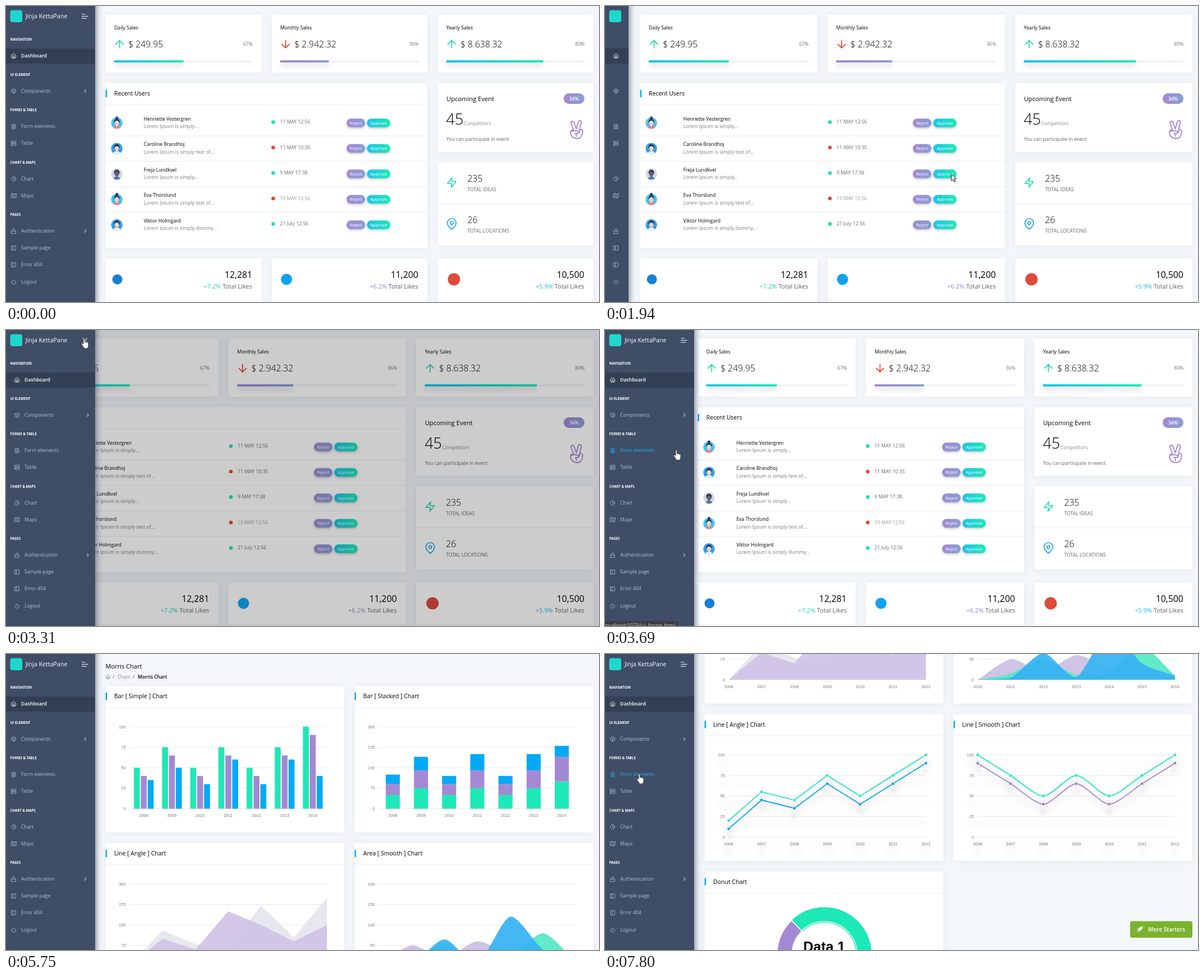
Animation, 1058 px wide and 529 px high, one loop 8 s. Source, as an HTML page with a canvas:

```html
<!DOCTYPE html>
<html lang="en">
<head>
<meta charset="utf-8">
<title>Dashboard tour</title>
<style>
html, body { margin: 0; width: 100%; height: 100%; overflow: hidden; background: #f4f7fa; }
canvas { display: block; width: 1058px; height: 529px; }
</style>
</head>
<body>
<canvas id="stage"></canvas>
<script>
const W = 1058, H = 529, LOOP = 8000, RIGHT = 1048, GAP = 18.5;
const canvas = document.getElementById('stage'), ctx = canvas.getContext('2d');
const dpr = window.devicePixelRatio || 1;
canvas.width = W * dpr;
canvas.height = H * dpr;

const GREEN = '#1de9b6', BLUE = '#04a9f5', PURPLE = '#a389d4', RED = '#e8452f', GREY = '#70737a';
const COOL = ['#1dc4e9', GREEN], VIOLET = [PURPLE, '#899ed4'];

const ICONS = {
  home: 'M3 9l9-7 9 7v11a2 2 0 0 1-2 2H5a2 2 0 0 1-2-2zM9 22V12h6v10',
  box: 'M21 16V8a2 2 0 0 0-1-1.7l-7-4a2 2 0 0 0-2 0l-7 4A2 2 0 0 0 3 8v8a2 2 0 0 0 1 1.7l7 4a2 2 0 0 0 2 0l7-4A2 2 0 0 0 21 16zM3.3 7L12 12l8.7-5M12 22V12',
  file: 'M14 2H6a2 2 0 0 0-2 2v16a2 2 0 0 0 2 2h12a2 2 0 0 0 2-2V8zM14 2v6h6M16 13H8M16 17H8M10 9H8',
  server: 'M2 3h20v7H2zM2 14h20v7H2zM6 6.5h1M6 17.5h1',
  pie: 'M21.2 15.9A10 10 0 1 1 8 2.8M22 12A10 10 0 0 0 12 2v10z',
  map: 'M1 6v16l7-4 8 4 7-4V2l-7 4-8-4zM8 2v16M16 6v16',
  lock: 'M3 11h18v11H3zM7 11V7a5 5 0 0 1 10 0v4',
  panel: 'M3 3h18v18H3zM9 3v18',
  power: 'M18.4 6.6a9 9 0 1 1-12.8 0M12 2v10',
  zap: 'M13 2L3 14h9l-1 8 10-12h-9z',
  pin: 'M21 10c0 7-9 13-9 13s-9-6-9-13a9 9 0 0 1 18 0zM15 10a3 3 0 1 1-6 0 3 3 0 0 1 6 0z',
  up: 'M12 19V5M5 12l7-7 7 7',
  down: 'M12 5v14M19 12l-7 7-7-7',
  chevron: 'M9 18l6-6-6-6',
  close: 'M19 5L5 19M5 5l14 14',
  menu: 'M2 5h11M2 12h20M2 19h15',
  victory: 'M6.5 13L2.2 .5a2.7 2.7 0 0 1 5.1-1.8L11.5 10.5 15.2-2.2a2.7 2.7 0 0 1 5.2 1.5L17.5 11.5C21 11 23.3 13 22.8 16C22.5 23 19 28 12.5 28C6 28 1.5 23.5 1 17C1 14 3.5 12 6.5 13zM2 15.5C5 13 9 14 13.5 14.5a2 2 0 0 1 0 4.5H9.5C11.5 20 12 22 11.5 24M17.5 11.5V16.5'
};
const ARROW = new Path2D('M0 0V12.5L3 9.8 5 14.4 7 13.5 5 9H9z');
const HAND = new Path2D('M4 10V1.8a1.3 1.3 0 0 1 2.6 0V7a1.2 1.2 0 0 1 2.3.4a1.2 1.2 0 0 1 2.2.5a1 1 0 0 1 1.9.6V13q0 2-1.2 3.2V18H5v-1.8Q3.5 15 2.5 13L.8 10.3a1.2 1.2 0 0 1 1.8-1.4z');
const ROCKET = new Path2D('M6-6C1-6-2-3-3.5-.5L-6 0-5 1.5-3.5 2-2 3.5-1.5 5 0 6 .5 3.5C3 2 6-1 6-6zM-5.5 3L-3 5.5-6 6z');

const MENU = [
  ['NAVIGATION', 59.5], ['Dashboard', 88.5, 'home'],
  ['UI ELEMENT', 123], ['Components', 151.5, 'box', true],
  ['FORMS & TABLE', 186], ['Form elements', 215, 'file'], ['Table', 245, 'server'],
  ['CHART & MAPS', 279.5], ['Chart', 308.5, 'pie'], ['Maps', 338.5, 'map'],
  ['PAGES', 372.5], ['Authentication', 402, 'lock', true], ['Sample page', 432, 'panel'],
  ['Error 404', 462, 'panel'], ['Logout', 492.5, 'power']
];

// Each step holds until the next one.
const mini = { main: 44, mini: true };
const charts = { page: 'charts', drawn: true };
const STEPS = [
  [0, {}],
  [940, { arrow: [169.5, 269.5] }],
  [1260, { ...mini, main: 54.5, dim: .18, hand: [114, 82], status: 66 }],
  [1610, { ...mini, nav: 60, ink: .3, arrow: [360, 230], status: 66 }],
  [1940, { ...mini, nav: 42, ink: 0, arrow: [618, 300] }],
  [2290, { ...mini, nav: 42, ink: 0, arrow: [330, 61] }],
  [2640, { ...mini, nav: 102, ink: .71, dim: .1, hand: [89, 25] }],
  [2980, { ...mini, dim: .2, hand: [147, 20] }],
  [3310, { ...mini, dim: .2, hand: [134, 15] }],
  [3690, { main: 146.8, hover: 'Form elements', hand: [122, 214.5], status: 130, path: '/ui_forms.html' }],
  [4020, { hover: 'Chart', hand: [110, 300], status: 130, path: '/charts-morris.html' }],
  [4360, { hover: 'Chart', hand: [104, 302], status: 355, path: '/charts-morris.html' }],
  [4710, { page: 'charts', status: 355, path: '/charts-morris.html' }],
  [5060, { page: 'charts' }],
  [5750, charts],
  [6430, { ...charts, arrow: [360, 327] }],
  [6780, { ...charts, scroll: 358, arrow: [363.5, 328.5], button: [516, .4] }],
  [7120, { ...charts, scroll: 460, arrow: [363.5, 328.5], button: [481, .85] }],
  [7470, { ...charts, scroll: 511.5, arrow: [36.5, 264.5], button: [477.5, .97] }],
  [7800, { ...charts, scroll: 511.5, hover: 'Form elements', hand: [56, 214], button: [477.5, 1] }]
];
const BASE = { page: 'dashboard', main: 159, nav: 159, ink: 1, dim: 0, scroll: 0, path: '' };

// y is the middle of the capital letters
function text(s, x, y, size, color, weight = 400, align = 'left', family = '"Open Sans"') {
  ctx.font = `${weight} ${size}px ${family}, sans-serif`;
  ctx.textAlign = align;
  ctx.fillStyle = color;
  ctx.fillText(s, x, y + size * .357);
}
function rect(x, y, w, h, color) {
  ctx.fillStyle = color;
  ctx.fillRect(x, y, w, h);
}
function circle(x, y, r, color) {
  ctx.fillStyle = color;
  ctx.beginPath();
  ctx.arc(x, y, r, 0, 7);
  ctx.fill();
}
function round(x, y, w, h, r, color) {
  ctx.fillStyle = color;
  ctx.beginPath();
  ctx.roundRect(x, y, w, h, r);
  ctx.fill();
}
function gradient(x, w, [from, to]) {
  const g = ctx.createLinearGradient(x, 0, x + w, 0);
  g.addColorStop(0, from);
  g.addColorStop(1, to);
  return g;
}
function shadowed(color, dy, blur, draw) {
  ctx.save();
  ctx.shadowColor = color;
  ctx.shadowOffsetY = dy * dpr;
  ctx.shadowBlur = blur * dpr;
  draw();
  ctx.restore();
}
function icon(name, cx, cy, scale, color, width = 2) {
  ctx.save();
  ctx.translate(cx, cy);
  ctx.scale(scale, scale);
  ctx.translate(-12, -12);
  ctx.strokeStyle = color;
  ctx.lineWidth = width;
  ctx.lineCap = ctx.lineJoin = 'round';
  ctx.stroke(new Path2D(ICONS[name]));
  ctx.restore();
}
function card(x, y, w, h) {
  shadowed('rgba(69,90,100,.09)', 1, 12, () => rect(x, y, w, h, '#fff'));
}
function header(title, x, y, w) {
  rect(x, y + 12, 2.5, 13, BLUE);
  text(title, x + 15.3, y + 18.7, 10.5, '#000');
  rect(x, y + 38, w, 1, '#eef0f3');
}

function salesCard(x, w, title, amount, share, fill, rising, colors) {
  const track = w - 30.6;
  card(x, 15.5, w, 103.5);
  text(title, x + 15.3, 38.7, 8.7, '#000');
  icon(rising ? 'up' : 'down', x + 24.8, 68.3, .95, rising ? '#1fd9b0' : RED, 1.8);
  text(amount, x + 40.5, 68.5, 15.8, '#000', 300);
  text(share, x + w - 15.5, 68, 8.7, GREY, 400, 'right');
  rect(x + 15.3, 97, track, 4, '#f0f4f8');
  shadowed('rgba(0,0,0,.16)', 6, 9, () =>
    rect(x + 15.3, 97, track * fill, 4, gradient(x + 15.3, track * fill, colors)));
}

function avatar(x, y, [back, shirt, skin, hair, bun]) {
  ctx.save();
  ctx.beginPath();
  ctx.arc(x, y, 10.2, 0, 7);
  ctx.clip();
  rect(x - 11, y - 11, 22, 22, back);
  circle(x, y + 12, 7.5, shirt);
  rect(x - 1.6, y + 1, 3.2, 5, skin);
  circle(x, y - 2.6, 5, hair);
  circle(x, y - .3, 3.9, skin);
  ctx.restore();
  if (bun) circle(x, y - 9.3, 2.4, hair);
}
const WOMAN = ['#43c3ea', '#f47a9a', '#fcd3b8', '#27366f', true];
const MAN = ['#2f9fe8', '#e6f1fb', '#fbd3b5', '#1e2e63'];
const USERS = [
  ['Henriette Vestergren', '...', '11 MAY 12:56', true, WOMAN],
  ['Caroline Brandhoj', ' text of...', '11 MAY 10:35', false, MAN],
  ['Freja Lundkvel', '...', '9 MAY 17:38', true, ['#d3d9e0', '#4d80b8', '#6a5f74', '#2f3554']],
  ['Eva Thorslund', ' text of...', '19 MAY 12:56', false, WOMAN],
  ['Viktor Holmgard', ' dummy...', '21 July 12:56', true, MAN]
];
function pill(label, x, y, w, h, size, colors) {
  shadowed('rgba(0,0,0,.22)', 2, 4, () => round(x, y, w, h, h / 2, gradient(x, w, colors)));
  text(label, x + w / 2, y + h / 2, size, '#fff', 400, 'center');
}
function usersCard(x, w) {
  const date = x + 311 + .516 * (w - 574), reject = x + 430 + .739 * (w - 574);
  card(x, 138, w, 295);
  header('Recent Users', x, 138, w);
  USERS.forEach(([name, tail, when, online, look], i) => {
    const y = 201.7 + 45.5 * i;
    avatar(x + 20, y + 7.5, look);
    text(name, x + .1184 * w, y, 8.7, '#000');
    text('Lorem Ipsum is simply' + tail, x + .1184 * w, y + 13.5, 8.7, '#777a80');
    circle(date - 12, y + 5.8, 3.3, online ? '#1fe0b4' : RED);
    text(when, date, y + 5.5, 8.7, i === 3 ? '#999b9f' : '#676a70');
    pill('Reject', reject, y - .5, 33, 15.5, 7.6, VIOLET);
    pill('Approve', reject + 36.3, y - .5, 41.5, 15.5, 7.6, COOL);
    if (i < 4) rect(x, y + 30, w, 1, '#e8ebef');
  });
}

function sideCards(x, w) {
  const left = x + 15.5;
  card(x, 138, w, 122.5);
  text('Upcoming Event', left, 166, 11.2, '#000');
  round(995, 156, 37, 19, 9.5, gradient(995, 37, VIOLET));
  text('34%', 1013.5, 165.5, 8.6, '#fff', 600, 'center');
  text('45', left - .5, 202, 27, '#000', 300);
  text('Competitors', left + 31, 210.3, 8.4, '#85888e');
  text('You can participate in event', left, 237.5, 8.7, '#62656b');
  icon('victory', 1018, 221, 1, PURPLE, 1.9);

  card(x, 279, w, 149);
  rect(x, 353, w, 1, '#e8ebef');
  [['zap', '#1fd9b0', '235', 'TOTAL IDEAS'], ['pin', '#1ba5ec', '26', 'TOTAL LOCATIONS']].forEach(([name, color, count, label], i) => {
    const y = 308 + 74 * i;
    icon(name, x + 25, y + 7.5, .86, color, 1.9);
    text(count, x + 53, y, 15.8, '#000', 300);
    text(label, x + 53, y + 19.5, 8.7, '#62656b');
  });
}

function likesCard(x, w, dot, dotX, radius, count, growth, color) {
  const right = x + w - 16.2;
  card(x, 451.5, w, 120);
  circle(x + dotX, 488.5, radius, dot);
  text(count, right, 480.3, 15.8, '#000', 400, 'right');
  text('Total Likes', right, 501, 11, '#5e6268', 400, 'right');
  text(growth + ' ', right - ctx.measureText('Total Likes').width, 501, 11, color, 400, 'right');
  rect(x, 526, w, 1, '#e8ebef');
}

function dashboard({ main }) {
  const first = main + 18.7, pitch = (RIGHT + GAP - first) / 3, w = pitch - GAP;
  const col = i => first + pitch * i;
  salesCard(col(0), w, 'Daily Sales', '$ 249.95', '67%', .5, true, COOL);
  salesCard(col(1), w, 'Monthly Sales', '$ 2.942.32', '36%', .35, false, VIOLET);
  salesCard(col(2), w, 'Yearly Sales', '$ 8.638.32', '80%', .7, true, COOL);
  usersCard(first, 2 * pitch - GAP);
  sideCards(col(2), w);
  likesCard(col(0), w, '#1781d8', 21, 9, '12,281', '+7.2%', '#1fd3ab');
  likesCard(col(1), w, '#10a3f0', 26.5, 10, '11,200', '+6.2%', '#9584d0');
  likesCard(col(2), w, '#dd4b39', 29, 11, '10,500', '+5.9%', '#1cb9e4');
}

// Cubic curve through the points, with slopes taken from the neighbours
function trace(points, smooth, floor) {
  const slope = i => {
    const a = points[Math.max(i - 1, 0)], b = points[Math.min(i + 1, points.length - 1)];
    return (b[1] - a[1]) / (b[0] - a[0]);
  };
  ctx.beginPath();
  points.forEach(([x, y], i) => {
    if (!i) return ctx.moveTo(x, y);
    if (!smooth) return ctx.lineTo(x, y);
    const [px, py] = points[i - 1], d = (x - px) / 4;
    ctx.bezierCurveTo(px + d, Math.min(floor, py + d * slope(i - 1)), x - d, Math.min(floor, y - d * slope(i)), x, y);
  });
}

const BARS = [[50, 75, 50, 75, 50, 75, 100], [40, 65, 40, 65, 40, 65, 90], [35, 50, 30, 60, 30, 60, 40]];
const BAR_COLORS = [GREEN, PURPLE, BLUE];
const CHARTS = [
  { title: 'Bar [ Simple ] Chart', kind: 'bar', year: 2008, max: 100, data: BARS, colors: BAR_COLORS },
  { title: 'Bar [ Stacked ] Chart', kind: 'stack', year: 2008, max: 300, data: BARS, colors: BAR_COLORS },
  { title: 'Line [ Angle ] Chart', kind: 'area', year: 2006, max: 300, colors: ['#e6e7ec', '#d0c4e7'],
    data: [[0, 130, 80, 70, 220, 105, 250], [0, 100, 60, 200, 150, 90, 150]] },
  { title: 'Area [ Smooth ] Chart', kind: 'area', smooth: true, year: 2010, max: 200, colors: ['#cdc0e5', '#58e8c3', '#36b3f3'],
    data: [[0, 50, 20, 60, 30, 25, 10], [0, 15, 50, 12, 20, 80, 10], [0, 5, 65, 7, 120, 40, 10]] },
  { title: 'Line [ Angle ] Chart', kind: 'line', year: 2006, max: 100, colors: [BLUE, GREEN],
    data: [[10, 45, 35, 65, 40, 65, 90], [20, 55, 45, 75, 50, 75, 100]] },
  { title: 'Line [ Smooth ] Chart', kind: 'line', smooth: true, year: 2006, max: 100, colors: [PURPLE, GREEN],
    data: [[90, 65, 40, 65, 40, 65, 90], [100, 75, 50, 75, 50, 75, 100]] },
  { title: 'Donut Chart', kind: 'donut' }
];

function plot({ kind, smooth, year, max, data, colors }, left, top) {
  const x0 = left + 43, span = 351.8, floor = top + 219.5, barred = kind === 'bar' || kind === 'stack';
  const Y = v => floor - 146.5 * v / max;
  const X = i => barred ? x0 + span * (i + .5) / 7 : x0 + span * i / 6;
  const label = (s, x, y, align) => text(s, x, y, 7.3, '#777', 400, align, '"Liberation Sans"');
  for (let i = 0; i <= 4; i++) {
    rect(x0, Y(max * i / 4) - .5, span, 1, '#e9e9e9');
    label(max * i / 4, x0 - 7, Y(max * i / 4), 'right');
  }
  for (let i = 0; i < 7; i++) label(year + i, X(i), top + 231.6, 'center');

  if (barred) {
    const group = span / 7 * (kind === 'bar' ? .7 : .5);
    const w = kind === 'bar' ? (group - 3.6) / 3 : group;
    for (let i = 0; i < 7; i++) {
      let base = 0;
      data.forEach((series, k) => {
        const shift = kind === 'bar' ? k * (w + 1.8) : 0;
        rect(X(i) - group / 2 + shift, Y(base + series[i]), w, floor - Y(series[i]), colors[k]);
        if (kind === 'stack') base += series[i];
      });
    }
    return;
  }
  data.forEach((series, k) => {
    const points = series.map((v, i) => [X(i), Y(v)]);
    trace(points, smooth, floor);
    if (kind === 'area') {
      ctx.lineTo(x0 + span, floor);
      ctx.lineTo(x0, floor);
      ctx.globalAlpha = .93;
      ctx.fillStyle = colors[k];
      ctx.fill();
      ctx.globalAlpha = 1;
      return;
    }
    ctx.strokeStyle = colors[k];
    ctx.lineWidth = 1.8;
    ctx.stroke();
    points.forEach(([x, y]) => {
      circle(x, y, 3, '#fff');
      circle(x, y, 2.4, colors[k]);
    });
  });
}

function donut(cx, cy) {
  const arc = (from, to, radius, width, color) => {
    ctx.beginPath();
    ctx.arc(cx, cy, radius, from * Math.PI / 180, to * Math.PI / 180);
    ctx.strokeStyle = color;
    ctx.lineWidth = width;
    ctx.stroke();
  };
  arc(150, 225.5, 71, 25, PURPLE);
  arc(227, 380, 72, 25, GREEN);
  arc(227, 380, 57.5, 1.3, GREEN);
  text('Data 1', cx, cy - 13.5, 25, '#000', 700, 'center', '"Liberation Sans"');
}

function chartsPage({ scroll, drawn }) {
  ctx.save();
  ctx.translate(0, -scroll);
  text('Morris Chart', 177.5, 22.3, 11.1, '#000');
  icon('home', 182, 40.5, .37, '#86816f');
  text('/', 190.5, 40.8, 8.7, '#555');
  text('Chart', 199, 40.8, 8.7, '#7e8580');
  text('/', 226, 40.8, 8.7, '#555');
  text('Morris Chart', 235, 40.8, 8.6, '#000', 600);
  CHARTS.forEach((chart, i) => {
    const x = 177.7 + 444.3 * (i % 2), y = 57 + 281 * (i >> 1), w = 425.8;
    card(x, y, w, 262);
    header(chart.title, x, y, w);
    if (!drawn) return;
    if (chart.kind === 'donut') donut(x + 213.5, y + 148.5);
    else if (chart.kind === 'line') shadowed('rgba(0,0,0,.12)', 13, 10, () => plot(chart, x, y));
    else plot(chart, x, y);
  });
  ctx.restore();
}

function sidebar({ nav, ink, mini, hover }) {
  const shift = mini ? 6 : 0;
  shadowed('rgba(63,77,103,.9)', 0, 12, () => rect(-20, -20, nav + 20, H + 40, '#3f4d67'));
  rect(0, 76, nav, 27, '#333f54');
  round(7.5, 7.5, 21.5, 21.5, 4, '#1fd8cd');
  const label = (s, x, y, size, color, weight) => {
    if (!ink) return;
    ctx.save();
    ctx.globalAlpha = ink;
    ctx.translate(x, 0);
    ctx.scale(ink, 1);
    text(s, 0, y, size, color, weight);
    ctx.restore();
  };
  label('Jinja KettaPane', 35, 18.5, 10.7, '#fff');
  if (nav > 150) icon(mini ? 'close' : 'menu', 141, 18.3, mini ? .52 : .54, '#dfe5f0', 2.2);
  for (const [name, y, glyph, nested] of MENU) {
    if (!glyph) {
      label(name, 7.5, y, 6.1, '#fff', 700);
      continue;
    }
    const active = name === 'Dashboard';
    const color = name === hover ? '#1fb9ec' : active ? '#fff' : '#b3c0d8';
    icon(glyph, 13.6 + shift, y + .5, .41, color);
    label(name, 27 + shift, y, 8.7, color, active ? 600 : 400);
    if (nested && ink) icon('chevron', mini ? nav - 13 : 141.5, y + .3, .42, '#c3cee0', 2.4);
  }
}

function starterButton([y, alpha]) {
  ctx.globalAlpha = alpha;
  round(937, y, 111, 29.5, 3, '#7ab32f');
  ctx.save();
  ctx.translate(954.5, y + 14);
  ctx.scale(.85, .85);
  ctx.fillStyle = '#fff';
  ctx.fill(ROCKET);
  ctx.restore();
  text('More Starters', 969, y + 14.5, 10, '#fff', 600);
  ctx.globalAlpha = 1;
}

function pointer(shape, [x, y], outline) {
  ctx.save();
  ctx.translate(x, y);
  ctx.fillStyle = '#fff';
  ctx.strokeStyle = outline;
  ctx.lineWidth = .9;
  ctx.fill(shape);
  ctx.stroke(shape);
  ctx.restore();
}

function render() {
  const t = performance.now() % LOOP;
  const state = { ...BASE, ...STEPS.findLast(([start]) => start <= t)[1] };
  ctx.setTransform(dpr, 0, 0, dpr, 0, 0);
  rect(0, 0, W, H, '#f4f7fa');
  if (state.page === 'dashboard') dashboard(state);
  else chartsPage(state);
  if (state.dim) rect(0, 0, W, H, `rgba(0,0,0,${state.dim})`);
  sidebar(state);
  if (state.button) starterButton(state.button);
  if (state.status) {
    round(-4, 520.5, state.status + 4, 14, 3, '#3b3e44');
    text('localhost:5079' + state.path, -2, 527.3, 9.4, '#c3c7cc');
  }
  if (state.arrow) pointer(ARROW, state.arrow, '#000');
  if (state.hand) pointer(HAND, state.hand, '#333');
  requestAnimationFrame(render);
}
render();
</script>
</body>
</html>
```
